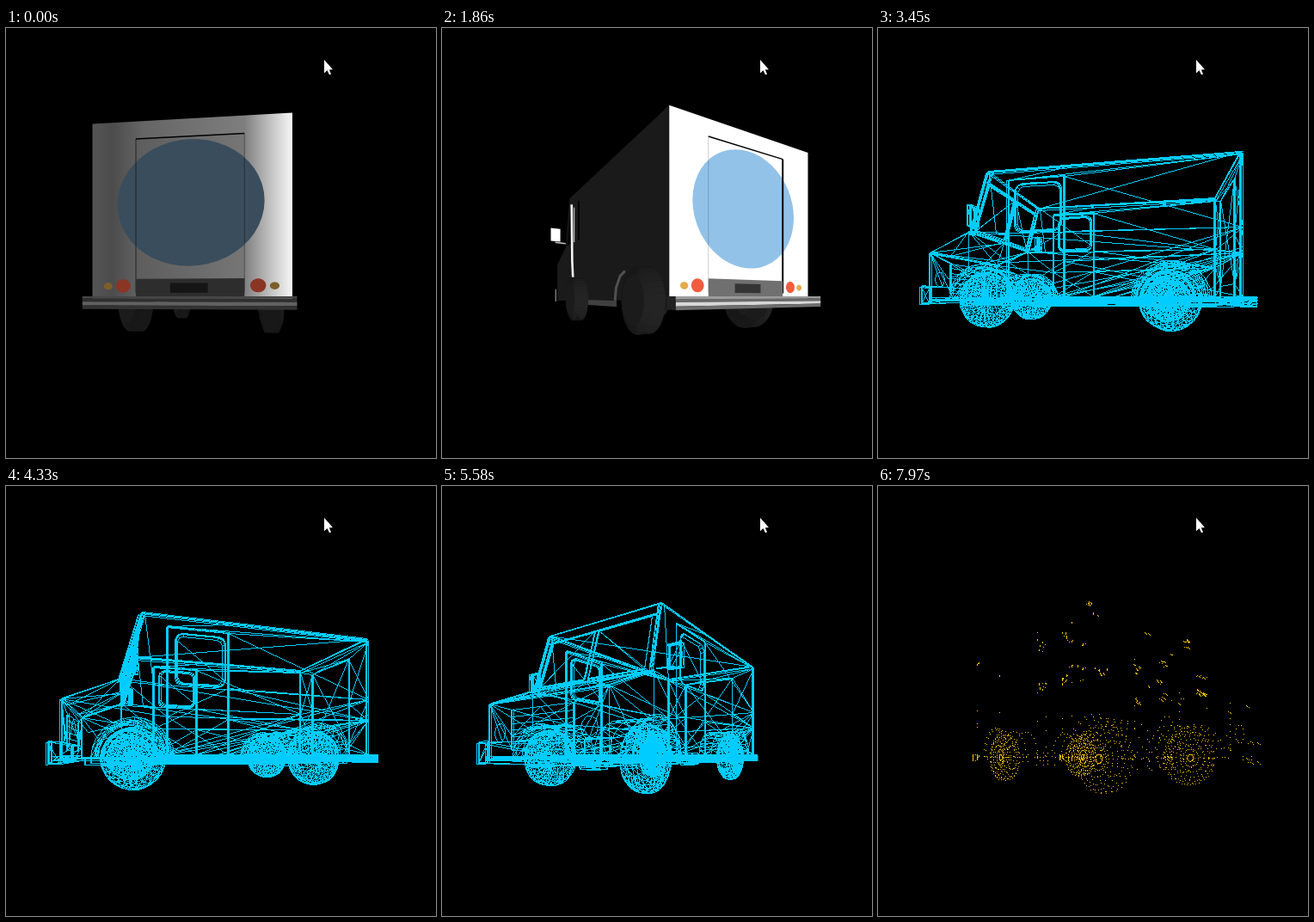
Animation, 500 px wide and 500 px high, one loop 8 s. Source, as an HTML page with a canvas:

```html
<!DOCTYPE html>
<html lang="en">
<head>
<meta charset="utf-8">
<title>Rotating truck</title>
<style>
html, body { margin: 0; width: 100%; height: 100%; overflow: hidden; background: #000; }
canvas { display: block; width: 100vw; height: 100vh; }
</style>
</head>
<body>
<canvas id="stage" width="500" height="500"></canvas>
<script>
const SIZE = 500, LOOP = 8000;
const WIRE_AT = 2030, POINTS_AT = 7360;
const FOCAL = 385, HORIZON = 312, DEPTH = 3.07, PIVOT = -0.052;
const CYAN = 0xffffcc00, AMBER = 0xff00ccff, DIM_AMBER = 0xff1f96cc;
const RAD = Math.PI / 180;

// main truck measures
const HALF = .57, BACK = -1.215, ROOF = .7, COWL = .84, NOSE = 1.215;
const AXLES = [.75, -.73];

const ctx = document.getElementById('stage').getContext('2d');
const image = ctx.createImageData(SIZE, SIZE);
const pixels = new Uint32Array(image.data.buffer);

let angle = 0, sin = 0, cos = 1;

// Each display style turns at its own speed, in degrees per second.
function setTime(t) {
  const span = (a, b) => Math.max(0, Math.min(t, b) - a) / 1000;
  angle = -6 + 19.4 * span(0, WIRE_AT) + 31.8 * span(WIRE_AT, POINTS_AT) + 28.5 * span(POINTS_AT, LOOP);
  sin = Math.sin(angle * RAD);
  cos = Math.cos(angle * RAD);
}

// A point is [forward, height above the horizon, sideways].
function project([f, h, w]) {
  const z = DEPTH + f * cos + w * sin;
  const x = PIVOT - f * sin + w * cos;
  return [250 + FOCAL * x / z, HORIZON - FOCAL * h / z];
}

// ---------- mesh ----------
const points = [], edges = [], index = new Map();

function vertex(p, dim) {
  const key = p.map(v => v.toFixed(3)).join();
  if (!index.has(key)) {
    index.set(key, points.length);
    points.push({ p, dim });
  }
  return index.get(key);
}
function path(list, closed, dim) {
  const ids = list.map(p => vertex(p, dim));
  for (let i = 1; i < ids.length; i++) edges.push([ids[i - 1], ids[i]]);
  if (closed) edges.push([ids[ids.length - 1], ids[0]]);
}
// A thin strip of metal: the same path, repeated slightly apart.
function trim(list, closed) {
  for (const d of [-.007, 0, .007]) {
    path(list.map(([f, h, w]) => [f + d, h - d, w * (1 + 1.4 * d)]), closed);
  }
}
function box(f0, f1, h0, h1, w0, w1) {
  const ring = f => [[f, h0, w0], [f, h1, w0], [f, h1, w1], [f, h0, w1]];
  const a = ring(f0), b = ring(f1);
  path(a, true);
  path(b, true);
  a.forEach((p, i) => { path([p, b[i]]); path([p, b[(i + 1) % 4]]); });
  path([a[0], a[2]]);
  path([b[0], b[2]]);
}
function roundRect(f0, f1, h0, h1, w, r) {
  const out = [];
  const corners = [[f1 - r, h1 - r], [f0 + r, h1 - r], [f0 + r, h0 + r], [f1 - r, h0 + r]];
  corners.forEach(([f, h], q) => {
    for (let i = 0; i < 3; i++) {
      const a = (q + i / 2) * Math.PI / 2;
      out.push([f + r * Math.cos(a), h + r * Math.sin(a), w]);
    }
  });
  return out;
}

const TYRE = [[.52, .03], [.525, .075], [.545, .12], [.55, .165], [.545, .2],
  [.525, .222], [.48, .228], [.435, .222], [.41, .19], [.4, .12]];

function wheelRing(f, side, [w, r], n) {
  return Array.from({ length: n }, (_, i) => {
    const a = i / n * 2 * Math.PI;
    return [f + r * Math.cos(a), -.027 + r * Math.sin(a), side * w];
  });
}
function wheelMesh(f, side) {
  const n = 26;
  let last = null;
  TYRE.forEach(profile => {
    const ring = wheelRing(f, side, profile, n);
    path(ring, true, true);
    if (last) ring.forEach((p, i) => path([p, last[i], ring[(i + 1) % n]], false, true));
    last = ring;
  });
}
function archMesh(f, side) {
  let last = null;
  for (const [w, r] of [[.58, .28], [.57, .262], [.5, .258], [.38, .258], [.25, .258]]) {
    const arc = Array.from({ length: 13 }, (_, i) => {
      const a = i * 15 * RAD;
      return [f + r * Math.cos(a), -.02 + r * Math.sin(a), side * w];
    });
    path(arc);
    if (last) arc.forEach((p, i) => path([p, last[i], arc[Math.min(i + 1, 12)]]));
    last = arc;
  }
}

function sideMesh(s) {
  const at = (f, h, w = HALF) => [f, h, s * w];
  // roof edge and rear corner
  trim([at(ROOF, 1, .56), at(BACK + .015, 1, .56), at(BACK + .015, -.02, .56)]);
  path([at(ROOF, .98), at(BACK, .98), at(BACK, -.02)]);
  path([at(ROOF, 1, .55), at(BACK, .985)]);
  path([at(BACK, .48), at(.06, .92), at(BACK, .98), at(.52, .92)]);
  path([at(BACK, .48), at(.06, .5), at(BACK, .3), at(.06, .27), at(BACK, 0), at(.06, 0)]);
  path([at(BACK, .3), at(.06, 0), at(BACK, .48), at(.52, 0), at(BACK, .3), at(.52, .27)]);
  path([at(BACK, .3), at(-.12, -.02), at(BACK, .34)]);
  path([at(BACK, .48), at(.65, .5), at(BACK, .3)]);
  path([at(BACK, .3), at(-.45, -.02), at(-.95, -.02), at(BACK, .3)]);
  // cab door and window
  trim([at(.06, -.02), at(.06, .92), at(.52, .92), at(.52, -.02)]);
  path([at(.52, .92), at(.06, .98)]);
  path([at(.06, 0), at(.52, .27), at(.06, .5)]);
  path([at(.06, .27), at(.52, 0), at(.06, 0)]);
  const outer = roundRect(.085, .46, .51, .88, s * HALF, .05);
  const inner = roundRect(.1, .445, .525, .865, s * .55, .045);
  trim(outer, true);
  path(inner, true);
  outer.forEach((p, i) => path([p, inner[i]]));
  path([at(.085, .56), at(.46, .83)]);
  // windshield
  for (const [f, w] of [[0, .565], [.015, .55], [-.02, .54]]) {
    trim([at(ROOF + f, .99, w), at(COWL + f, .5, w + .02)]);
  }
  path([at(ROOF, .99), at(COWL + .015, .5, .57)]);
  path([at(ROOF - .02, .99), at(.62, .5), at(COWL, .5, .585)]);
  trim([at(ROOF + .02, .92, .5), at(ROOF + .02, .92, .02), at(.83, .54, .02), at(.83, .54, .52)], true);
  path([at(ROOF + .02, .92, .02), at(.83, .54, .52)]);
  path([at(ROOF + .02, .92, .02), at(COWL, .5, .585)]);
  // hood and nose
  trim([at(COWL, .52, .595), at(NOSE, .365), at(NOSE, -.03), at(.52, -.03)]);
  path([at(COWL, .52, .6), at(COWL, .2, .6), at(NOSE, .365), at(1.05, .15), at(COWL, .2, .6)]);
  path([at(NOSE, .365), at(.52, .27), at(COWL, .52, .6), at(.52, .5)]);
  path([at(NOSE, .365), at(NOSE, .3, .3), at(NOSE, .04, .3), at(NOSE, .365), at(NOSE, .1, .42)]);
  path([at(COWL, .52, .6), at(NOSE, .365, .3), at(COWL, .53, .02)]);
  trim([at(NOSE, .3, .3), at(NOSE, .04, .3)]);
  const lamp = Array.from({ length: 10 }, (_, i) =>
    at(NOSE + .01, .15 + .065 * Math.sin(i * Math.PI / 5), .43 + .065 * Math.cos(i * Math.PI / 5)));
  path(lamp, true);
  // sill, chassis, mirror
  trim([at(.48, -.02), at(BACK, -.02)]);
  trim([at(.48, -.045), at(BACK, -.045)]);
  path([at(.5, -.03, .45), at(BACK, -.03, .45)]);
  box(1.1, BACK, -.08, -.03, s * .22, s * .28);
  box(.6, -.5, -.07, 0, s * .34, s * .4);
  box(.77, .73, .54, .69, s * .645, s * .745);
  trim([at(.75, .54, .65), at(.75, .69, .65), at(.75, .69, .74), at(.75, .54, .74)], true);
  trim([at(.79, .545, .585), at(.76, .545, .7)]);
  // rear face and door
  trim([at(BACK, .9, .31), at(BACK, -.02, .31)]);
  path([at(BACK, .9, .31), at(BACK, .98), at(BACK, .48, .31), at(BACK, .48)]);
  path([at(BACK, .48, .31), at(BACK, .3), at(BACK, .1, .31), at(BACK, 0)]);
  path([at(BACK, .9, .31), at(BACK, .48), at(BACK, .1, .31), at(BACK, .3), at(BACK, .3, -.31)]);
  path([at(BACK, .9, .31), at(BACK, .1, -.31)]);
  path([at(BACK, .98), at(BACK, .9, -.31)]);
  for (const f of AXLES) {
    wheelMesh(f, s);
    archMesh(f, s);
  }
}

function buildMesh() {
  for (const s of [-1, 1]) sideMesh(s);
  const across = (f, h, w, draw = path) => draw([[f, h, -w], [f, h, w]]);
  for (const [f, h, w] of [[ROOF, 1, .56], [ROOF + .02, .925, .54], [COWL, .52, .595],
    [NOSE, .365, HALF], [BACK + .015, 1, .56], [BACK, .9, .31]]) across(f, h, w, trim);
  for (const h of [.98, .48, .1]) across(BACK, h, h > .5 ? HALF : .31);
  path([[ROOF, 1, .56], [BACK, 1, -.56]]);
  for (let h = .3; h > .03; h -= .045) across(NOSE, h, .3);
  path([[NOSE, .3, -.3], [NOSE, .12, .3], [NOSE, .3, 0], [NOSE, .04, -.3]]);
  path([[COWL, .52, -.6], [NOSE, .365, HALF], [COWL, .52, 0], [NOSE, .365, -HALF]]);
  // bumpers
  box(NOSE, 1.295, -.06, .084, -.58, .58);
  box(NOSE, 1.28, -.04, -.01, -.5, .5);
  for (const s of [-1, 1]) {
    trim([[1.295, -.06, s * .58], [1.295, .084, s * .58], [1.295, .084, s * .47], [1.295, -.06, s * .47]], true);
    path([[1.295, -.06, s * .58], [1.295, .084, s * .47], [NOSE, .084, s * .58]]);
  }
  box(BACK, -1.3, -.07, 0, -.585, .585);
  for (const h of [-.01, -.03, -.055]) across(-1.3, h, .585, trim);
  // underside
  for (const f of AXLES) {
    box(f - .025, f + .025, -.055, -.005, -.42, .42);
    box(f - .07, f + .07, -.11, .02, -.07, .07);
  }
  for (let f = 1.1; f > -1.2; f -= .2) across(f, -.035 - .02 * Math.sin(f * 9), .5);
}

function plot(x, y, colour) {
  if (x >= 0 && y >= 0 && x < SIZE && y < SIZE) pixels[y * SIZE + x] = colour;
}
function drawLine(a, b, colour) {
  let x = Math.round(a[0]), y = Math.round(a[1]);
  const x1 = Math.round(b[0]), y1 = Math.round(b[1]);
  const dx = Math.abs(x1 - x), dy = -Math.abs(y1 - y);
  const sx = x < x1 ? 1 : -1, sy = y < y1 ? 1 : -1;
  let err = dx + dy;
  for (;;) {
    plot(x, y, colour);
    if (x === x1 && y === y1) return;
    const e = 2 * err;
    if (e >= dy) { err += dy; x += sx; }
    if (e <= dx) { err += dx; y += sy; }
  }
}

function drawMesh(asPoints) {
  pixels.fill(0xff000000);
  const screen = points.map(v => project(v.p));
  if (asPoints) {
    screen.forEach(([x, y], i) => {
      const dim = points[i].dim && i % 3 === 0;
      plot(Math.round(x), Math.round(y), dim ? DIM_AMBER : AMBER);
    });
  } else {
    for (const [a, b] of edges) drawLine(screen[a], screen[b], CYAN);
  }
  ctx.putImageData(image, 0, 0);
}

// ---------- shaded truck ----------
function light(tilt = 0) {
  return Math.min(1, .1 + 1.9 * Math.max(0, Math.sin((angle + 15 + tilt) * RAD)));
}
function shade(r, g, b, k = light()) {
  return `rgb(${[r, g, b].map(v => Math.round(v * k)).join()})`;
}
function trace(list) {
  ctx.beginPath();
  list.forEach(p => ctx.lineTo(...project(p)));
}
function face(list, fill) {
  trace(list);
  ctx.closePath();
  ctx.fillStyle = fill;
  ctx.fill();
}
function stroke(list, colour, width) {
  trace(list);
  ctx.strokeStyle = colour;
  ctx.lineWidth = width;
  ctx.stroke();
}
function rearRect(w0, w1, h0, h1, fill, f = BACK) {
  face([[f, h0, w0], [f, h1, w0], [f, h1, w1], [f, h0, w1]], fill);
}
function rearDisc(w, h, rw, rh, fill) {
  const list = Array.from({ length: 48 }, (_, i) => {
    const a = i * Math.PI / 24;
    return [BACK, h + rh * Math.sin(a), w + rw * Math.cos(a)];
  });
  face(list, fill);
}
function solidWheel(f, side) {
  const n = 32;
  const rings = [TYRE[9], TYRE[7], TYRE[5], TYRE[3]].map(p => wheelRing(f, side, p, n));
  face(rings[0], '#151515');
  for (let r = 0; r < 3; r++) {
    for (let i = 0; i < n; i++) {
      const j = (i + 1) % n;
      const k = 24 + Math.max(0, -Math.cos(i / n * 2 * Math.PI)) * 12 * light();
      const quad = [rings[r][i], rings[r][j], rings[r + 1][j], rings[r + 1][i]];
      face(quad, `rgb(${k},${k},${k})`);
      stroke(quad, ctx.fillStyle, 1);
    }
  }
  face(rings[3], '#1b1b1b');
}
function gradient(w0, w1, stops) {
  const a = project([BACK, .5, w0]), b = project([BACK, .5, w1]);
  const g = ctx.createLinearGradient(a[0], 0, b[0], 0);
  stops.forEach(([at, colour]) => g.addColorStop(at, colour));
  return g;
}

function drawSolid() {
  ctx.fillStyle = '#000';
  ctx.fillRect(0, 0, SIZE, SIZE);
  for (const f of AXLES) solidWheel(f, 1);
  rearRect(-.4, .4, -.08, .05, '#161616', AXLES[1]);
  rearDisc(-.05, -.075, .04, .035, '#1d1d1d');

  // mirror and shaded left side
  const W = -HALF;
  stroke([[.79, .55, -.585], [.76, .55, -.7]], shade(200, 200, 200), 1.5);
  rearRect(-.745, -.65, .56, .69, shade(255, 255, 255), .75);
  face([[1.28, .084, -.58], [1.28, -.06, -.58], [NOSE, -.06, -.58], [NOSE, .084, -.58]], '#777');
  face([[BACK, 1, W], [BACK, -.02, W], [NOSE, -.05, W], [NOSE, .365, W], [COWL, .52, W], [ROOF, 1, W]], '#1a1a1a');
  face([[.68, .9, W], [.79, .53, W], [.62, .53, W], [.62, .9, W]], '#080808');
  face([[.46, -.03, W], [.46, -.075, W], [-.52, -.075, W], [-.52, -.03, W]], '#404040');
  if (angle > 15) {
    stroke([[.62, .92, W], [.6, .35, W], [.54, -.02, W]], '#f4f4f4', 2.6);
    stroke([[.53, .87, W], [.53, .53, W]], '#ddd', 1);
    stroke([[.38, .9, W], [.38, .53, W]], '#000', 1.5);
    stroke([[-.49, -.03, W], [-.51, .06, W], [-.58, .14, W], [-.66, .17, W]], '#505050', 3);
  }
  for (const f of AXLES) solidWheel(f, -1);

  // rear wall
  const white = tilt => shade(255, 255, 255, light(tilt));
  rearRect(-HALF, HALF, -.02, 1, gradient(-HALF, HALF,
    [[0, white(-2)], [.1, white(-3)], [.25, white(0)], [.76, white(3)], [.9, white(12)], [1, white(18)]]));
  rearRect(-.31, .31, .1, .9, gradient(-.31, .31, [[0, white(-1)], [1, white(2)]]));
  rearDisc(0, .527, .42, .357, shade(146, 194, 232));
  const edge = w => [[BACK, .9, w], [BACK, .02, w]];
  const turned = angle > 10;
  stroke(edge(-.31), turned ? 'rgba(0,0,0,.2)' : '#222', 1);
  stroke(edge(.31), turned ? '#000' : 'rgba(0,0,0,.35)', turned ? 2 : 1);
  stroke([[BACK, .9, -.31], [BACK, .9, .31]], '#000', 1.5);
  rearRect(-.31, .31, -.01, .1, shade(112, 112, 112));
  rearRect(-.11, .105, .02, .075, shade(52, 52, 52));
  for (const s of [-1, 1]) {
    rearDisc(s * .385, .06, .043, .038, shade(240, 92, 62, Math.max(.58, light())));
    rearDisc(s * .475, .058, .026, .02, shade(228, 170, 75, Math.max(.55, light())));
  }

  // rear bumper
  const k = Math.max(.45, light());
  const bands = [[0, -.012, 155], [-.012, -.03, 105], [-.03, -.05, 215], [-.05, -.07, 110]];
  face([[BACK, 0, -.585], [-1.3, 0, -.585], [-1.3, -.07, -.585], [BACK, -.07, -.585]], '#222');
  for (const [h1, h0, v] of bands) rearRect(-.585, .585, h0, h1, shade(v, v, v, k), -1.3);
}

function drawCursor() {
  ctx.beginPath();
  for (const p of [[370, 37], [370, 52.5], [373.5, 49.3], [376, 54.5], [378, 53.6], [375.8, 48.6], [380, 48.2]]) {
    ctx.lineTo(...p);
  }
  ctx.closePath();
  ctx.fillStyle = '#fff';
  ctx.fill();
}

function frame() {
  const t = performance.now() % LOOP;
  setTime(t);
  if (t < WIRE_AT) drawSolid();
  else drawMesh(t >= POINTS_AT);
  drawCursor();
  requestAnimationFrame(frame);
}

buildMesh();
frame();
</script>
</body>
</html>
```
